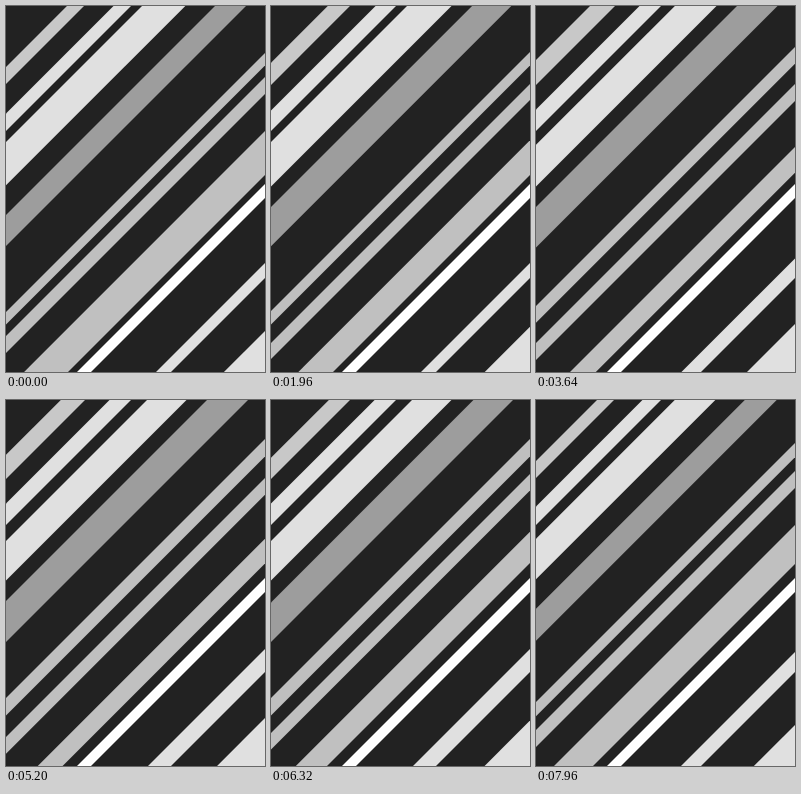
Animation, 259 px wide and 366 px high, one loop 8 s. Source, as an HTML page:

```html
<!DOCTYPE html>
<html lang="en">
<head>
<meta charset="utf-8">
<title>Diagonal stripes</title>
<style>
  html, body { margin: 0; width: 100%; height: 100%; overflow: hidden; background: #222; }
  svg { display: block; width: 100%; height: 100%; }
</style>
</head>
<body>
<svg viewBox="0 0 259 366" preserveAspectRatio="none"></svg>
<script>
const LOOP = 8000;
const HEIGHT = 366;
const svg = document.querySelector('svg');

// Smooth 0..1 progress between two times in seconds.
function ease(t, start, end) {
  const p = Math.min(1, Math.max(0, (t - start) / (end - start)));
  return (1 - Math.cos(Math.PI * p)) / 2;
}

// An edge that glides from rest to far, waits, and glides back.
const glide = (rest, far, outStart, outEnd, backStart, backEnd) => t =>
  rest + (far - rest) * (ease(t, outStart, outEnd) - ease(t, backStart, backEnd));
const fixed = position => () => position;

// Each edge is the line x + y = position.
const stripes = [
  ['#c8c8c8', glide(61, 54, -.2, 3.6, 4.4, 8), glide(78, 79, .8, 2.2, 6.3, 7.9)],
  ['#e0e0e0', glide(107.5, 103.5, 0, 3, 6, 9), fixed(125)],
  ['#e0e0e0', glide(136, 141, 2, 5, 6.6, 9.5), glide(179.3, 180.5, 0, 2, 6, 8)],
  ['#9d9d9d', glide(209, 201, 0, 2.1, 5.6, 8.2), glide(240, 242, 1, 5, 6.4, 9)],
  ['#bfbfbf', glide(306, 298, 1, 5, 6.4, 9.5), glide(318.5, 315.5, 2, 5, 7, 10)],
  ['#bfbfbf', glide(330, 337, 0, 1.45, 5.3, 7.2), glide(347, 354, 0, 2.6, 4.9, 7.3)],
  ['#c0c0c0', glide(384, 400, -.2, 3.7, 4.3, 8), glide(428, 422, 2, 6, 7.2, 10)],
  ['#ffffff', fixed(437), fixed(451)],
  ['#e0e0e0', glide(516, 508, 2, 5, 6.5, 10), fixed(531)],
  ['#e0e0e0', glide(584, 577, -.2, 3.6, 5, 8.2), fixed(630)]
].map(([color, near, far]) => {
  const shape = document.createElementNS(svg.namespaceURI, 'polygon');
  shape.setAttribute('fill', color);
  svg.append(shape);
  return { shape, near, far };
});

function draw(now) {
  const t = (now % LOOP) / 1000;
  for (const { shape, near, far } of stripes) {
    const a = near(t), b = far(t);
    shape.setAttribute('points', `${a},0 ${b},0 ${b - HEIGHT},${HEIGHT} ${a - HEIGHT},${HEIGHT}`);
  }
}

const startTime = performance.now();
function tick() {
  draw(performance.now() - startTime);
  requestAnimationFrame(tick);
}
tick();
</script>
</body>
</html>
```
